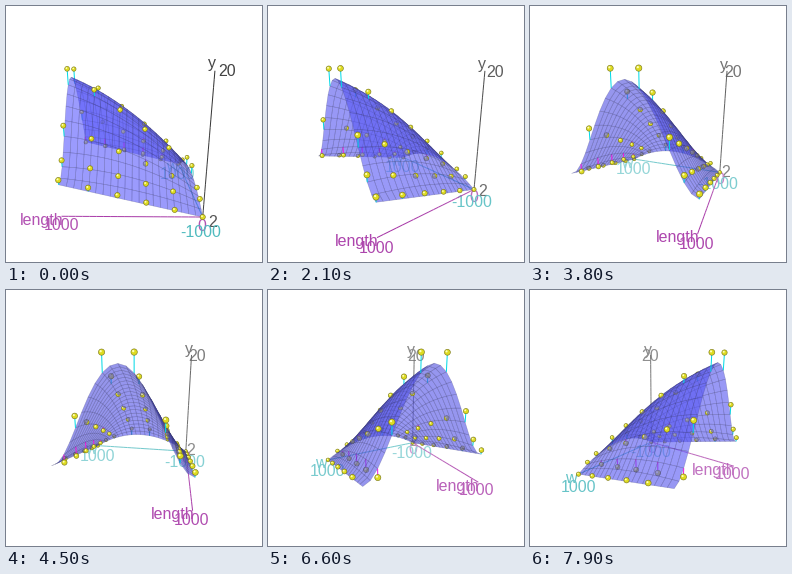
Animation of 256x256 px, one loop 8000 ms. Source, as a matplotlib script:

```python
import numpy as np
import matplotlib.pyplot as plt
from matplotlib.animation import FuncAnimation
from matplotlib.collections import PolyCollection

SIZE, DPI = 256, 100
FRAMES, INTERVAL = 80, 100
PX = 72 / DPI

# camera
TILT = np.radians(14.5)
DIST, FOCAL = 4.05, 233
CX, CY = 128.6, 125.5

# box limits: X carries -w, Z carries length
X0, X1 = 0.97, -1.03
Z0, Z1 = -0.99, 1.05
XMID = (X0 + X1) / 2
YMAX = 1.02

BLACK = np.array([0.16, 0.16, 0.16])
PURPLE = np.array([0.62, 0.14, 0.62])
CYAN = np.array([0.12, 0.66, 0.68])

# (u, height at length 0, height at length 1000)
COLUMNS = [(1, 0, 0.56), (0.8, 0.17, 0.77), (0.6, 0.25, 1.23),
           (0.2, 0.45, 2.03), (-0.2, 0.45, 2.03), (-0.6, 0.25, 1.23),
           (-0.8, 0.15, 0.555), (-1, 0, 0.52)]


def height(u, v):
    bump = 1 - u * u
    ramp = (1 - v) * 0.32 * bump + v * (0.49 + 1.41 * bump ** 2)
    return ramp + 0.75 * v * (1 - v) * (1 - u ** 4)


def world(u, v, h):
    return np.stack(np.broadcast_arrays(
        u + XMID, YMAX * (h - 1), Z0 + (Z1 - Z0) * v), -1)


def turn(p, angle):
    """Rotate about the vertical axis, then tilt towards the camera."""
    p = np.asarray(p, float)
    x, y, z = p[..., 0], p[..., 1], p[..., 2]
    ca, sa = np.cos(angle), np.sin(angle)
    ct, st = np.cos(TILT), np.sin(TILT)
    side, front = x * ca + z * sa, z * ca - x * sa
    return np.stack([side, y * ct - front * st, DIST - front * ct - y * st], -1)


def project(p, angle):
    """Return screen positions, depth and pixels per unit."""
    q = turn(p, angle)
    scale = FOCAL / q[..., 2]
    xy = np.stack([CX + scale * q[..., 0], CY - scale * q[..., 1]], -1)
    return xy, q[..., 2], scale


def fog(color, depth, extra=0.0):
    f = np.clip(0.06 + 0.14 * (depth - 3) + extra, 0, 0.6)
    return color * (1 - f) + f


# surface grid
N = 20
gu, gv = np.meshgrid(np.linspace(-1, 1, N + 1), np.linspace(0, 1, N + 1))
GRID = world(gu, gv, height(gu, gv))


def cells(a):
    quads = np.stack([a[:-1, :-1], a[:-1, 1:], a[1:, 1:], a[1:, :-1]], 2)
    return quads.reshape(-1, 4, a.shape[-1])


QUADS = cells(GRID)

# samples and their residual lines
balls, feet, foot_colors = [], [], []
for u, low, high in COLUMNS:
    for v in np.linspace(0, 1, 6):
        if u == -1 and v == 1:
            continue
        h, s = low + (high - low) * v, height(u, v)
        balls.append(world(u, v, h))
        feet.append(world(u, v, s))
        foot_colors.append((0, 0.85, 0.9, 1) if h > s else (0.95, 0.1, 0.85, 1))
BALLS, FEET = np.array(balls), np.array(feet)

# axes
ORIGIN = np.array([X0, -YMAX, Z0])
TOP = np.array([X0, YMAX, Z0])
L_END = np.array([X0, -YMAX, Z1])
W_END = np.array([X1, -YMAX, Z0])
AXES = [(TOP, BLACK), (L_END, PURPLE), (W_END, CYAN)]
STEPS = np.linspace(0, 1, 21)[:, None]

OUT = 1.11
LOWER = np.array([0, -0.14, 0])
LOWEST = np.array([0, -0.24, 0])
# text, anchor, colour, alignment, pixel shift of the baseline
LABELS = [
    ("y", TOP + [0, 0.06, 0], BLACK, "right", (1, 2.5)),
    ("20", [X0 * OUT, YMAX, Z0 * OUT], BLACK, "center", (0, 5.7)),
    ("2", [X0 * OUT, -YMAX, Z0 * OUT], BLACK, "center", (0, 5.7)),
    ("length", L_END, PURPLE, "right", (1.5, 8.5)),
    ("0", ORIGIN + LOWER, PURPLE, "center", (0, 5.7)),
    ("1000", L_END + LOWER, PURPLE, "center", (-0.6, 5.7)),
    ("w", W_END, CYAN, "right", (-1.5, 8.5)),
    ("-1000", ORIGIN + LOWEST, CYAN, "center", (-1, 5.7)),
    ("1000", W_END + LOWEST, CYAN, "center", (-1, 5.7)),
]

ring = np.linspace(0, 2 * np.pi, 17)[:-1]
CIRCLE = np.stack([np.cos(ring), np.sin(ring)], -1)

fig = plt.figure(figsize=(SIZE / DPI, SIZE / DPI), dpi=DPI, facecolor="white")
ax = fig.add_axes([0, 0, 1, 1])
ax.set_xlim(0, SIZE)
ax.set_ylim(SIZE, 0)
ax.axis("off")

scene = PolyCollection([], zorder=2)
ax.add_collection(scene, autolim=False)
texts = [ax.text(0, 0, s, family="Liberation Sans", fontsize=16 * PX,
                 ha=align, va="baseline", zorder=1)
         for s, _, _, align, _ in LABELS]

CLEAR = (0, 0, 0, 0)
MESH = (0.2, 0.2, 0.4, 0.3)


def quad_parts(angle):
    xy, depth, _ = project(QUADS, angle)
    q = turn(QUADS, angle)
    n = np.cross(q[:, 2] - q[:, 0], q[:, 3] - q[:, 1])
    n /= np.linalg.norm(n, axis=1, keepdims=True) + 1e-9
    shade = 0.84 + 0.16 * np.abs(n[:, 2])
    for poly, d, s in zip(xy, depth.mean(1), shade):
        yield d, poly, (0.35 * s, 0.35 * s, s, 0.6), MESH, 0.55


def ball_parts(angle):
    xy, depth, scale = project(BALLS, angle)
    foot, foot_depth, _ = project(FEET, angle)
    for p, d, k, f, fd, c in zip(xy, depth, scale, foot, foot_depth, foot_colors):
        r = 0.038 * k
        yield (d + fd) / 2 - 0.01, np.array([p, f]), CLEAR, c, 1
        yield d - 0.05, p + r * CIRCLE, (0.87, 0.86, 0.13, 1), (0.48, 0.47, 0.1, 1), 0.6
        yield (d - 0.051, p + r * (0.36 * CIRCLE - [0.28, 0.3]),
               (1, 1, 0.72, 1), CLEAR, 0)


def axis_parts(angle):
    for end, color in AXES:
        xy, depth, _ = project(ORIGIN + (end - ORIGIN) * STEPS, angle)
        for i in range(len(xy) - 1):
            d = (depth[i] + depth[i + 1]) / 2
            yield d, xy[i:i + 2], CLEAR, (*fog(color, d), 1), 1


def draw(i):
    angle = np.radians(-90.5 + 1.8 * i)
    parts = [*quad_parts(angle), *ball_parts(angle), *axis_parts(angle)]
    parts.sort(key=lambda part: -part[0])
    _, polys, faces, edges, widths = zip(*parts)
    scene.set_verts(polys)
    scene.set_facecolor(faces)
    scene.set_edgecolor(edges)
    scene.set_linewidth([w * PX for w in widths])
    for text, (_, anchor, color, _, shift) in zip(texts, LABELS):
        xy, depth, _ = project(anchor, angle)
        text.set_position(xy + shift)
        text.set_color(fog(color, depth, 0.1))
    return [scene, *texts]


anim = FuncAnimation(fig, draw, frames=FRAMES, interval=INTERVAL,
                     repeat=True, repeat_delay=0)
plt.show()
```
